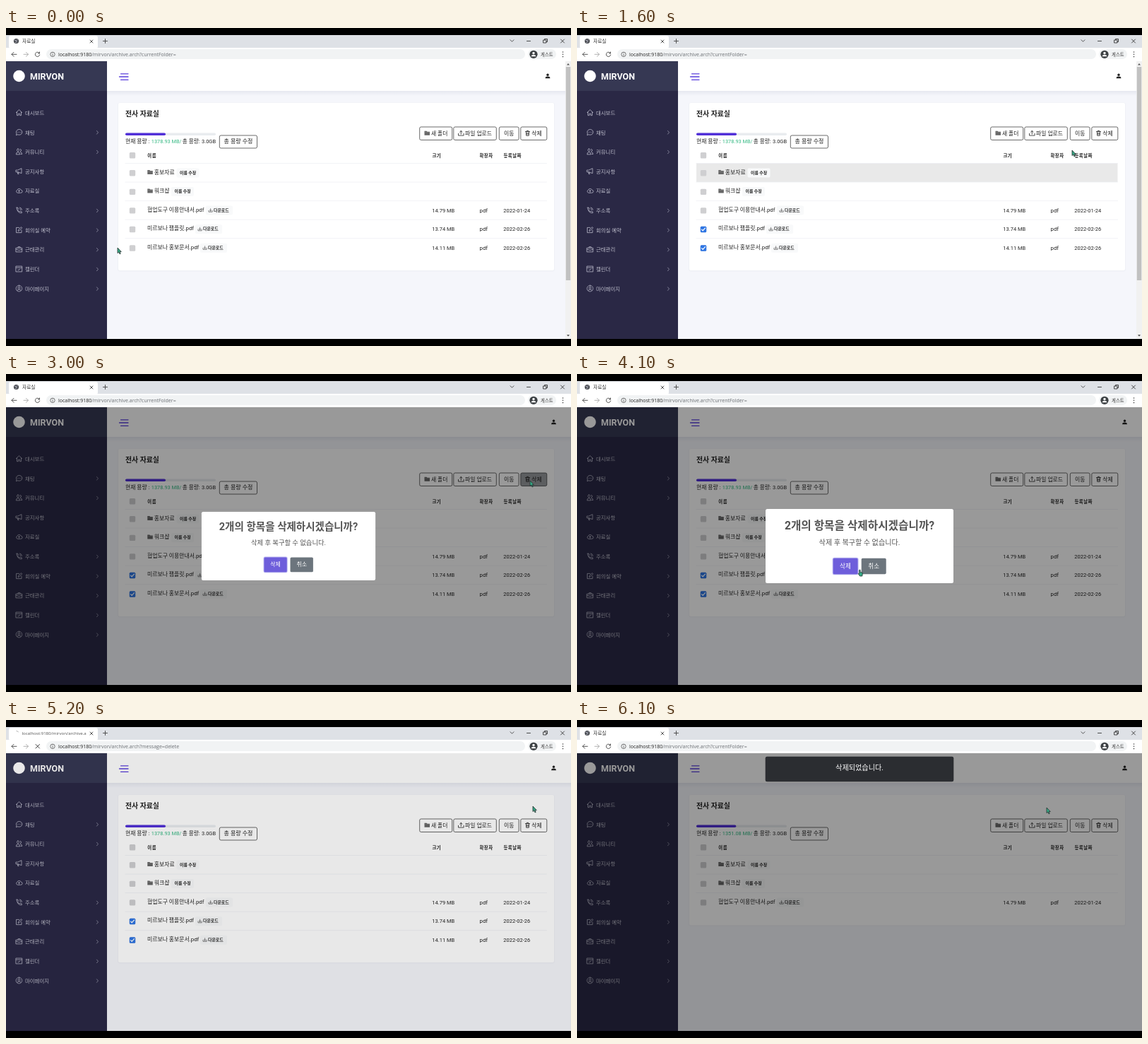
An HTML page that plays this animation: 800 by 450 pixels, repeating every 6.2 s.

```html
<!DOCTYPE html>
<html lang="ko">
<head>
<meta charset="utf-8">
<title>자료실</title>
<style>
html, body { margin: 0; width: 100%; height: 100%; overflow: hidden; background: #000; }
svg { display: block; width: 100vw; height: 100vh; }
text { font-family: Roboto, "Noto Sans CJK KR", "Noto Sans CJK", sans-serif; white-space: pre; }
.ui { font-family: "Open Sans", "Noto Sans CJK KR", "Noto Sans CJK", sans-serif; }
.head { letter-spacing: .45px; }
.hide { display: none; }
</style>
</head>
<body>
<svg id="stage" viewBox="0 0 800 450"></svg>
<script>
const LOOP = 6200, STEP = 100;

const rect = (x, y, w, h, fill, r = 0, more = '') =>
  `<rect x="${x}" y="${y}" width="${w}" height="${h}" fill="${fill}" rx="${r}" ${more}/>`;
const circle = (x, y, r, fill, more = '') => `<circle cx="${x}" cy="${y}" r="${r}" fill="${fill}" ${more}/>`;
// y is the middle of the line of text
const text = (x, y, size, str, fill = '#222', more = '') =>
  `<text x="${x}" y="${y + size * .36}" font-size="${size}" fill="${fill}" ${more}>${str}</text>`;
const line = (d, color, width = .8, x = 0, y = 0, more = '') =>
  `<path d="${d}" transform="translate(${x} ${y})" fill="none" stroke="${color}" stroke-width="${width}" stroke-linecap="round" stroke-linejoin="round" ${more}/>`;
const group = (id, body, more = '') => `<g id="${id}" ${more}>${body}</g>`;
const BOLD = 'font-weight="700"', MID = 'text-anchor="middle"';

const folder = (x, y) =>
  `<path d="M${x} ${y - 3}h3l1 1h3.5v5h-7.500z" fill="#666"/>` + line(`M${x} ${y - 1}h7.5`, '#999', .4);
const button = (x, y, w, h = 18.5) => rect(x, y, w, h, '#fff', 2, 'stroke="#444" stroke-width=".8"');
const trash = (x, y) => line('M0 1.2H6M2 1V0H4V1M.8 1.500L1.200 7H4.800L5.200 1.500M2.300 3V5.500M3.700 3V5.500', 'currentColor', .8, x, y);
const tray = (x, y, s, up) =>
  line(`M0 4V7H8V4M4 5V0M2.2 ${up ? 1.8 : 3.2}L4 ${up ? 0 : 5}L5.800 ${up ? 1.8 : 3.2}`, '#333', .9, x, y, '').replace('translate(', `scale(1) translate(`).replace('" fill', ` scale(${s})" fill`);

function browser() {
  const host = 'localhost:9180', path = '/mirvon/archive.arch?';
  const url = q => text(74, 37.3, 7, `<tspan fill="#222">${host}</tspan>${path}${q}`, '#6a6e73', 'class="ui"');
  return rect(0, 10, 800, 18, '#dee1e6') + rect(4, 11, 126, 18, '#fff', 3) + rect(0, 28, 800, 19, '#fff')
    + rect(57, 30, 678, 14, '#f1f3f4', 7) + rect(739, 30, 40, 14, '#f1f3f4', 7)
    + line('M0 0L4 4M4 0L0 4', '#444', .9, 119, 17) + line('M3 0V6M0 3H6', '#444', .9, 137.500, 15.500)
    + line('M0 0L2.500 2.500L5 0', '#333', .8, 714, 16.800) + line('M0 0H5', '#222', .8, 737.500, 18.500)
    + line('M0 1.500H4V5.500H0ZM1.500 1.500V0H5.500V4H4', '#222', .8, 761, 15.500) + line('M0 0L5 5M5 0L0 5', '#222', .8, 785.500, 16)
    + line('M7 3H0M3 0L0 3L3 6', '#444', .9, 8, 34.300) + line('M0 3H6.500M3.500 0L6.500 3L3.500 6', '#aaa', .9, 25, 34.300)
    + circle(66, 37.300, 3.200, 'none', 'stroke="#555" stroke-width=".8"') + line('M0 0V1.600M0 -1.600V-1.500', '#555', .8, 66, 37.300)
    + circle(747, 37.300, 5.600, '#3c4043') + circle(747, 35.500, 1.700, '#fff') + '<path d="M743.700 40.300a3.300 2.600 0 0 1 6.600 0z" fill="#fff"/>'
    + text(757, 37.300, 6.400, '게스트', '#333') + [34, 37.300, 40.600].map(y => circle(788.500, y, .8, '#444')).join('')
    + group('idle', circle(14.500, 18.500, 3.600, '#4a4d52') + line('M-2 -1.500L0 -1L1.500 -2M-1 1.500L1 .5', '#dde', .8, 14.500, 18.800)
      + text(23, 18.700, 6.700, '자료실', '#333')
      + line('M5.700 1.500A3.200 3.200 0 1 0 6.200 4M6 0V2H4', '#444', .9, 41.500, 34)
      + url('currentFolder='))
    + group('busy', line('M0 0A3 3 0 0 1 2.500 1.500', '#999', .8, 15, 15.500)
      + text(22.500, 18.700, 6.100, host + '/mirvon/archive.a', '#555', 'class="ui"')
      + line('M0 0L5.500 5.500M5.500 0L0 5.500', '#444', 1, 42, 34.500) + url('message=delete'));
}

const MENU = [
  ['대시보드', 0, 'M.8 5L5 1L9.200 5M2 4.200V9H4V6.500H6V9H8V4.200'],
  ['채팅', 1, 'M1 9L1.500 7A4.200 3.900 0 1 1 3.400 8.600ZM3.200 5V5.100M5.200 5V5.100M7.200 5V5.100'],
  ['커뮤니티', 1, 'M3.500 1A1.500 1.700 0 1 1 3.400 1ZM.8 8.500Q1 5.500 3.500 5.500T6.200 8.500ZM6.500 1.500A1.400 1.500 0 0 1 6.800 4.500M7 5.500Q9.200 5.800 9.200 8.500H7.500'],
  ['공지사항', 0, 'M.8 3.500H3L8.500 1V8L3 6H.8ZM2.500 6L3.300 9H4.500L4 6.500'],
  ['자료실', 0, 'M3 8A2.100 2.100 0 0 1 2.400 4A2.900 2.900 0 0 1 7.800 4A2 2 0 0 1 7.500 8ZM5 6.800V4.200M4 5.200L5 4.200L6 5.200'],
  ['주소록', 1, 'M1.500 1.200H3.300L4 3.600L3 4.600Q4 6.500 5.600 7L6.600 6.200L8.800 7V8.800Q2.500 9.500 1.500 1.200M6 1Q8.800 1.500 9 4.300M6 2.800Q7.200 3.200 7.300 4.300'],
  ['회의실 예약', 1, 'M8.500 5.500V9H1V1.800H5M3.700 6.500L4.200 4.700L8 1L9.300 2.300L5.500 6Z'],
  ['근태관리', 1, 'M.8 3H9.200V8.600H.8ZM3.500 3V1.400H6.500V3M.8 5L5 6.200L9.200 5'],
  ['캘린더', 1, 'M.8 1.200H9.200V9H.8ZM.8 3.300H9.200M3.500 6.500H4.500L6.500 5.200'],
  ['마이페이지', 1, 'M5 .7A4.300 4.300 0 1 1 4.900 .7ZM5 2.600A1.500 1.600 0 1 1 4.900 2.600ZM2.200 8Q3 6.300 5 6.300T7.800 8']
];

function sidebar() {
  return rect(0, 47, 143, 393, '#2a2845') + rect(0, 47, 143, 42, '#363853')
    + circle(18.500, 68, 8.300, '#fff') + text(34, 68.200, 12.500, 'MIRVON', '#fff', BOLD)
    + MENU.map(([name, more, icon], i) => {
      const y = 120.200 + i * 27.650;
      return line(icon, '#b9b9c9', .8, 13.500, y - 5.500) + text(27, y, 7.400, name, '#bdbdcb')
        + (more ? line('M0 0L2 2.300L0 4.600', '#a5a5b8', .7, 128.500, y - 2.300) : '');
    }).join('');
}

const ROWS = [
  ['홍보자료', 239], ['워크샵', 231.500],
  ['협업도구 이용안내서.pdf', 281, '14.79', '2022-01-24'],
  ['미르보나 팸플릿.pdf', 266, '13.74', '2022-02-26'],
  ['미르보나 홍보문서.pdf', 273, '14.11', '2022-02-26']
];
const ROW_TOP = 191.500, ROW_H = 26.550;
const box = y => rect(174.800, y - 4, 8.400, 8.400, '#cfcfd1', 1.500);

function row([name, end, size, date], i) {
  const top = ROW_TOP + i * ROW_H, y = top + 13.300;
  let s = rect(169, top, 596.500, ROW_H, '#e9e9e9', 0, `id="hover${i}"`)
    + line(`M169 ${top}H765.500`, '#eceef2', .7) + box(y + .3);
  if (size) {
    s += text(200, y - .8, 7.850, name) + rect(end + 2, y - 6.300, 38, 13, '#f8f9fa', 2)
      + tray(end + 6, y - 2.200, .65, false) + text(end + 13, y - .1, 5.900, '다운로드', '#222', BOLD)
      + text(603.300, y, 7.500, size + ' MB') + text(670.500, y, 7.800, 'pdf') + text(704.300, y, 7.500, date);
  } else {
    s += folder(200.300, y - .8) + text(209.800, y - 1, 7.850, name)
      + rect(end + 2.500, y - 6.300, 32, 13, '#f8f9fa', 2) + text(end + 7, y, 5.900, '이름 수정', '#222', BOLD);
  }
  if (i > 2) s += group('tick' + i, rect(174.800, y - 3.700, 8.400, 8.400, '#2f76e4', 1.500)
    + line('M0 2L1.700 3.700L5 0', '#fff', 1.200, 176.500, y - 1.400));
  return group('row' + i, s);
}

function page() {
  const head = (x, s) => text(x, 180.500, 6.400, s, '#222', BOLD + ' class="head"');
  return rect(143, 47, 657, 393, '#f5f6fb') + rect(143, 89, 657, 7, 'url(#shade)') + rect(143, 47, 657, 42, '#fff')
    + line('M162.500 64.800H173M160.500 69H173M162.500 73.300H173', '#5a3fdc', 1.300)
    + group('user', circle(767, 66.300, 1.700, '#222') + '<path d="M763.700 71.300v-.8q0 -2 3.300 -2t3.300 2v.8z" fill="#222"/>')
    + rect(158, 105.500, 619, 239, '#eff1f6', 3, 'id="edge"') + rect(159, 106, 617, 237, '#fff', 2, 'id="card"')
    + text(169, 121.800, 9.900, '전사 자료실', '#222', 'font-weight="600"')
    + rect(169, 148.500, 128, 3.600, '#e9ecef', 1.800) + rect(169, 148.500, 57, 3.600, '#5130d8', 1.800, 'id="bar"')
    + text(169, 160, 7.800, '현재 용량 :') + text(205.800, 160, 7.300, '', '#5cc69b', 'id="used" font-weight="500"')
    + text(249.800, 160, 7.600, '총 용량:') + text(277, 160, 7.450, '3.0GB')
    + button(302.300, 152, 53.200, 18) + text(329, 160.500, 8, '총 용량 수정', '#222', MID)
    + button(585.700, 140, 46) + folder(592.500, 148.800) + text(602, 149, 7.800, '새 폴더')
    + button(633.800, 140, 60.500) + tray(640.500, 145.500, .95, true) + text(650, 149, 7.850, '파일 업로드')
    + button(698.300, 140, 27.800) + text(712.300, 149, 7.850, '이동', '#222', MID)
    + button(728.800, 140, 37) + rect(728.800, 140, 37, 18.500, '#343a40', 2, 'id="press"')
    + group('del', trash(735.500, 145.300) + text(744.200, 149, 7.850, '삭제', 'currentColor'))
    + box(180) + head(200.300, '이름') + head(603.500, '크기') + head(670.500, '확장자') + head(704.500, '등록날짜')
    + ROWS.map(row).join('')
    + group('scroll', rect(792, 47, 8, 393, '#f1f1f1') + rect(792.800, 55, 6.400, 302, '#c1c1c1')
      + '<path d="M794 52.500l2 -2.500 2 2.500zM794 434l2 2.500 2 -2.500z" fill="#555"/>');
}

const dialog = rect(-133, -52.500, 266, 105, '#fff', 2.500)
  + text(0, -29.500, 15.700, '2개의 항목을 삭제하시겠습니까?', '#545454', BOLD + ' ' + MID)
  + text(0, -5.300, 10.100, '삭제 후 복구할 수 없습니다.', '#545454', MID)
  + rect(-38.300, 16.200, 36.800, 24.600, '#b7b2ef', 2.500) + rect(-37.300, 17.200, 34.800, 22.600, '#6e5edb', 1.800)
  + rect(2.700, 17.200, 35, 22.600, '#6c757d', 1.800)
  + text(-20, 28, 8.600, '삭제', '#fff', MID) + text(20.200, 28, 8.600, '취소', '#fff', MID);
const toast = rect(-133.300, -17.700, 266.600, 35.400, '#2b2d31', 2.500) + text(0, -2.300, 10.150, '삭제되었습니다.', '#fff', MID);

stage.innerHTML = '<defs><linearGradient id="shade" x2="0" y2="1"><stop stop-color="#e6e8f0"/><stop offset="1" stop-color="#f5f6fb"/></linearGradient></defs>'
  + rect(0, 0, 800, 450, '#000') + browser() + page() + sidebar()
  + rect(0, 47, 800, 393, '#fcfcff', 0, 'id="veil"') + rect(0, 47, 800, 393, '#000', 0, 'id="dim"')
  + group('dialog', dialog) + group('toast', toast)
  + group('cursor', '<path id="arrow" d="M0 0V7.600L1.800 6.100L3 8.900L4.200 8.400L3 5.700H5.300Z"/><path id="hand" d="M1 0Q2 -.3 2.100 .8V3.500L4.800 4Q5.600 4.300 5.300 6L4.800 9H1.500L-.8 5.600Q-.5 4.600 .7 5.500V.6Z"/>',
    'fill="#35aa86" stroke="#26302f" stroke-width=".8"');

const el = id => document.getElementById(id);
const set = (id, name, value) => el(id).setAttribute(name, value);
const show = (id, on) => el(id).classList.toggle('hide', !on);
const clamp = v => Math.max(0, Math.min(1, v));

// Linear track through points [time, ...values]
function track(keys, t) {
  const i = keys.findIndex(k => k[0] > t);
  if (i < 0) return keys[keys.length - 1].slice(1);
  if (i === 0) return keys[0].slice(1);
  const a = keys[i - 1], b = keys[i], f = (t - a[0]) / (b[0] - a[0]);
  return a.slice(1).map((v, n) => v + (b[n + 1] - v) * f);
}

const PATH = [
  [0, 158, 311], [500, 177, 282], [700, 177, 282], [850, 177, 308], [1000, 177, 308],
  [1600, 701, 173], [2300, 742, 151], [3500, 742, 151], [4100, 399, 277], [4200, 396, 276],
  [4600, 385, 270], [4950, 385, 270], [5150, 746, 122], [5200, 746, 122], [5400, 707, 118], [6100, 665, 124]
];
const pop = ms => track([[0, .7], [135, 1.05], [240, .95], [300, 1]], ms)[0];

const OPEN = 2913, CLOSE = 4960, RELOAD = 5260;

function draw(t) {
  const done = t >= RELOAD, modal = t >= 2900, busy = t >= 5050 && !done;
  show('busy', busy);
  show('idle', !busy);
  show('scroll', !modal);
  set('user', 'transform', `translate(${modal ? 8.500 : 0} 0)`);

  el('used').textContent = done ? '1351.08 MB/' : '1378.93 MB/';
  set('bar', 'width', done ? 56.300 : 57);
  set('card', 'height', done ? 184.500 : 237);
  set('edge', 'height', done ? 186.500 : 239);
  show('row3', !done);
  show('row4', !done);
  show('tick3', t >= 600);
  show('tick4', t >= 900);

  const [hx, hy] = track(PATH, t - 100);
  const over = hx > 169 && !modal ? Math.floor((hy - ROW_TOP) / ROW_H) : -1;
  ROWS.forEach((_, i) => show('hover' + i, i === over));

  const press = clamp((t - 2100) / 150) * clamp((3125 - t) / 250);
  set('press', 'opacity', press);
  el('del').style.color = press > .6 ? '#fff' : '#222';

  const dim = t < CLOSE ? clamp((t - 2880) / 100) : done ? clamp((t - RELOAD) / 100) : 1 - (t - CLOSE) / 310;
  set('dim', 'opacity', .4 * dim);
  set('veil', 'opacity', done ? 1 - clamp((t - 5300) / 270) : 0);

  const out = clamp((t - CLOSE) / 150);
  show('dialog', t >= OPEN && out < 1);
  set('dialog', 'opacity', 1 - out);
  set('dialog', 'transform', `translate(400 243.500) scale(${pop(t - OPEN) - out / 2})`);
  show('toast', done);
  set('toast', 'transform', `translate(400 69.500) scale(${pop(t - RELOAD - 5)})`);

  const [x, y] = track(PATH, t), hand = t >= 4100 && t < CLOSE;
  show('hand', hand);
  show('arrow', !hand);
  set('cursor', 'transform', `translate(${x} ${y})`);
}

const start = performance.now();
function tick() {
  const t = (performance.now() - start) % LOOP;
  draw(Math.floor(t / STEP) * STEP);
  requestAnimationFrame(tick);
}
tick();
</script>
</body>
</html>
```
